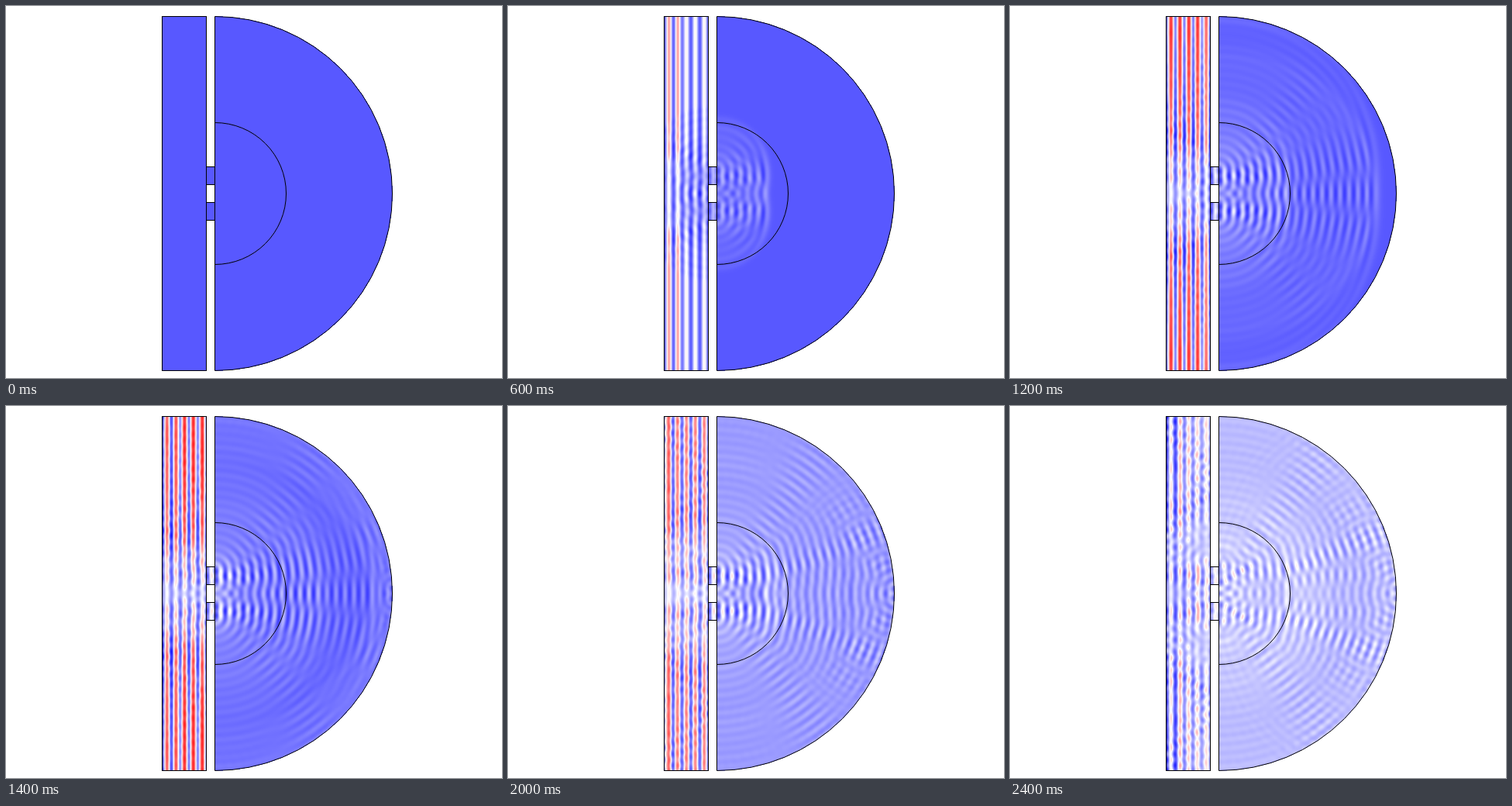
Recreate the animation shown at these times as an HTML page with a canvas. Size 640 px wide and 480 px high, loop 2.5 s.

```html
<!DOCTYPE html>
<html lang="en">
<head>
<meta charset="utf-8">
<title>Double slit wave</title>
<style>
  html, body { margin: 0; width: 100%; height: 100%; overflow: hidden; background: #fff; }
  canvas { display: block; }
</style>
</head>
<body>
<canvas id="stage" width="640" height="480"></canvas>
<script>
const ctx = document.getElementById('stage').getContext('2d');

// Geometry in pixels; the solver covers the lower half and is mirrored about AXIS.
const LEFT = 202, AXIS = 242, WIDTH = 297, HALF = 229;
const STRIP = 57, WALL = 68, RADIUS = 228.7;

// Wave equation with unit cell size. SPEED slightly outruns the grid dispersion,
// so the strip is driven just below its resonance.
const WAVELENGTH = 11.4, OMEGA = 2 * Math.PI / WAVELENGTH;
const STEPS = 41, DT = 2 * WAVELENGTH / STEPS, SPEED = 1.0175;
const DT2 = (SPEED * DT) ** 2;
const AMPLITUDE = 45, ZERO_LEVEL = 88;
const FRAMES = 25, FRAME_MS = 100;

function isOpen(x, y) {
  if (x < 0 || y < 0 || y >= HALF) return false;
  if (x < STRIP) return true;
  if (x < WALL) return y >= 11 && y < 34;
  return Math.hypot(x - WALL + 0.5, y + 0.5) < RADIUS;
}

const cells = [], ids = new Map();
for (let y = 0; y < HALF; y++) {
  for (let x = 0; x < WIDTH; x++) {
    if (isOpen(x, y)) {
      ids.set(y * WIDTH + x, cells.length);
      cells.push([x, y]);
    }
  }
}

// All walls reflect: a closed face points back to the cell itself.
const count = cells.length;
const near = new Int32Array(count * 4);
const driven = [];
cells.forEach(([x, y], c) => {
  if (x === 0) driven.push(c);
  [[1, 0], [-1, 0], [0, 1], [0, -1]].forEach(([dx, dy], k) => {
    const nx = x + dx, ny = y + dy;
    near[c * 4 + k] = isOpen(nx, ny) ? ids.get(ny * WIDTH + nx) : c;
  });
});

let now = new Float64Array(count), old = new Float64Array(count), tick = 0;

function step() {
  for (let c = 0, k = 0; c < count; c++, k += 4) {
    const u = now[c];
    const lap = now[near[k]] + now[near[k + 1]] + now[near[k + 2]] + now[near[k + 3]] - 4 * u;
    old[c] = 2 * u - old[c] + DT2 * lap;
  }
  const push = DT2 * AMPLITUDE * OMEGA * Math.sin(OMEGA * DT * tick++);
  for (const c of driven) old[c] += push;
  [now, old] = [old, now];
}

// Blue, white, red scale
function paintField() {
  const image = ctx.createImageData(WIDTH, HALF * 2), data = image.data;
  data.fill(255);
  cells.forEach(([x, y], c) => {
    const v = Math.max(0, Math.min(510, ZERO_LEVEL + now[c]));
    const red = Math.min(v, 255), blue = Math.min(510 - v, 255);
    for (const row of [HALF + y, HALF - 1 - y]) {
      const p = (row * WIDTH + x) * 4;
      data[p] = red;
      data[p + 1] = Math.min(red, blue);
      data[p + 2] = blue;
    }
  });
  return image;
}

const frames = [paintField()];
function getFrame(n) {
  while (frames.length <= n) {
    for (let i = 0; i < STEPS; i++) step();
    frames.push(paintField());
  }
  return frames[n];
}

function drawOutlines() {
  ctx.lineWidth = 1;
  ctx.strokeStyle = '#000';
  ctx.strokeRect(201.5, 13.5, 57, 457);
  ctx.strokeRect(258.5, 207.5, 11, 23);
  ctx.strokeRect(258.5, 253.5, 11, 23);
  for (const [rx, ry] of [[229, 228.5], [92, 91.5]]) {
    ctx.beginPath();
    ctx.ellipse(269.5, AXIS, rx, ry, 0, -Math.PI / 2, Math.PI / 2);
    ctx.closePath();
    ctx.stroke();
  }
}

let start;
function draw(time) {
  start ??= time;
  const n = Math.floor((time - start) / FRAME_MS) % FRAMES;
  ctx.fillStyle = '#fff';
  ctx.fillRect(0, 0, 640, 480);
  ctx.putImageData(getFrame(n), LEFT, AXIS - HALF);
  drawOutlines();
  requestAnimationFrame(draw);
}
requestAnimationFrame(draw);
</script>
</body>
</html>
```
